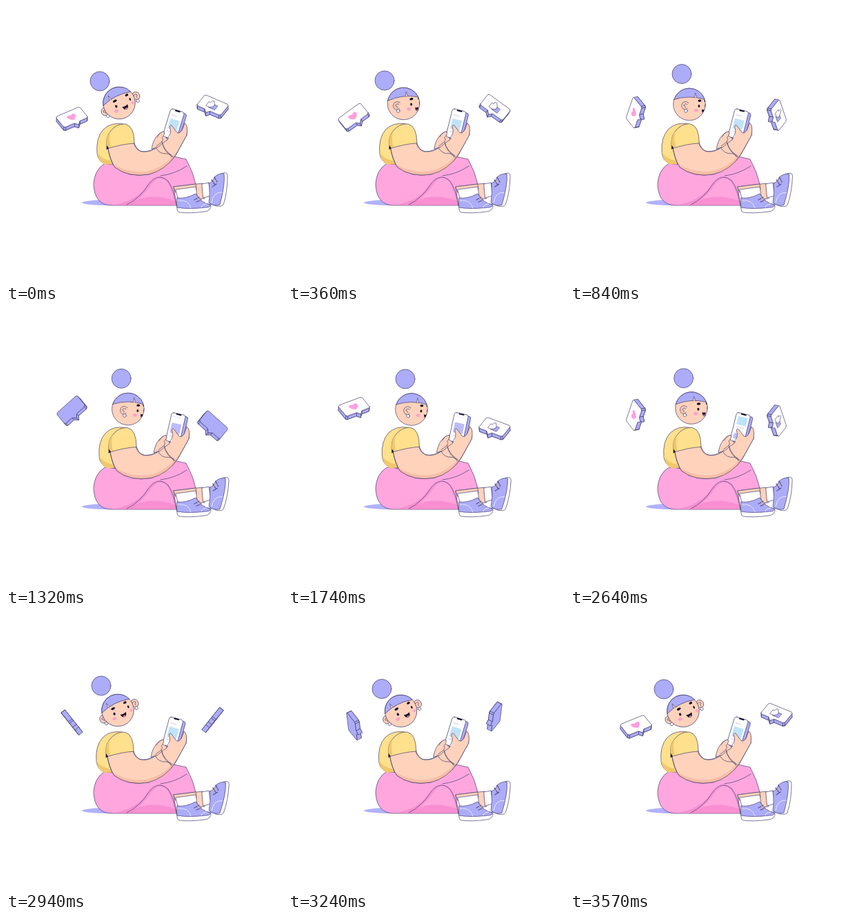
An HTML page for the animation above (3600 ms loop, 400x400 px).

```html
<!DOCTYPE html>
<html lang="en">
<head>
<meta charset="utf-8">
<title>Scrolling on the phone</title>
<style>
  html, body { margin: 0; width: 100%; height: 100%; overflow: hidden; background: #fff; }
  svg { display: block; width: 100vw; height: 100vh; stroke: #45406e; stroke-width: .7; stroke-linejoin: round; stroke-linecap: round; }
  .skin { fill: #ffd2bc; } .lav { fill: #acacf8; } .white { fill: #fff; } .pink { fill: #ffa6df; }
  .yellow { fill: #ffe08c; } .dark { fill: #15132b; } .line { fill: none; } .flat { stroke: none; }
</style>
</head>
<body>
<svg viewBox="0 0 400 400">
  <clipPath id="skull"><circle r="23.3"/></clipPath>
  <clipPath id="screen"><rect x="-8.5" y="-16" width="17" height="33"/></clipPath>

  <ellipse class="flat" fill="#b2b2fa" cx="150" cy="285" rx="40" ry="4"/>

  <!-- far foot -->
  <path class="skin" d="M268 259L285 257L288 279L272 280Z"/>
  <path class="white" d="M284 258L294 256L297 275L286 278Z"/>
  <g id="farShoe">
    <path class="white" d="M312 243Q321 239 321 246Q321 270 315 288Q313 291 305 290L297 287Z"/>
    <path class="lav" d="M294 257Q299 256 302 248Q308 242 316 243Q318 258 310 288Q301 291 294 285Q296 272 294 257Z"/>
    <path class="line" stroke="#fff" d="M298 285Q300 269 313 270"/>
    <path class="line" stroke="#5c5390" stroke-width="1.3" d="M298 252L303 259M302 248L306 255M299 262L305 258"/>
    <path class="line" stroke="#e9c46a" d="M300 256L305 252"/>
  </g>

  <!-- legs -->
  <path class="pink" d="M142 229Q128 238 127 258Q128 289 154 289H247L243 262L275 258Q271 240 261 222L225 214Z"/>
  <path class="flat" fill="#f78fd0" d="M154 288.5Q190 283 207 258Q221 241 234 252Q241 262 246 288.5Z"/>
  <path class="flat pink" d="M181 284Q198 278 210 259Q222 243 233 254Q240 264 244 282Q210 270 181 284Z"/>
  <path class="line" d="M175 288Q194 279 206 259Q220 240 235 254Q243 265 247 289M155 229Q171 231 180 237M262 232Q244 244 224 246"/>

  <!-- near foot -->
  <path class="skin" d="M243 262L275 258L276 266L246 270Z"/>
  <path class="white" d="M246 266L275 262L277 275L250 281Z"/>
  <path class="white" d="M248 289L297 287Q298 297 288 298Q266 301 251 299Q247 298 248 289Z"/>
  <path class="lav" d="M248 278Q260 280 275 272Q282 285 296 288Q297 292 289 292Q264 295 248 292Z"/>
  <path class="line" stroke="#fff" d="M249 282Q265 280 268 293M283 292Q284 287 291 287"/>
  <path class="line" stroke="#5c5390" stroke-width="1.3" d="M273 281L280 277M276 284L283 281"/>
  <path class="line" stroke="#e9c46a" d="M277 278L282 282"/>

  <g id="torso">
    <path class="yellow" d="M156 229Q135 232 132 214Q130 191 141 179Q152 168 170 171L168 205Z"/>
    <path class="flat" fill="#f0c76d" d="M144 230Q134 227 132 212Q138 222 151 224L155 229Z"/>
    <path class="skin" d="M147 203Q151 224 158 234Q178 249 207 244Q231 238 246 216L262 187Q263 172 258 169L234 187Q226 196 221 203Q209 213 197 211Q189 209 185 196Z"/>
    <path class="flat" fill="#f8bda7" d="M155 229Q180 244 207 239Q232 232 247 211Q235 240 205 244Q176 248 158 234Z"/>
    <path class="line" d="M185 199Q189 211 199 211Q211 211 220 203M226 197Q229 212 242 219M217 205Q222 215 233 214Q238 214 240 219M148 207Q151 225 158 234Q178 249 207 244Q231 238 246 216L262 187"/>
    <path class="yellow" d="M146 207Q144 190 151 182Q160 170 173 171Q186 174 186 199Q168 200 146 207Z"/>
    <path class="flat" fill="#f0c76d" d="M146 206Q144 190 151 182Q149 197 152 204Z"/>
    <path class="dark flat" d="M146 202L149 206L146 208Z"/>
    <path class="skin" d="M211 207Q213 193 222 185Q229 180 232 185L234 194Q226 199 221 204Z"/>
    <g id="phone">
      <rect class="lav" x="-6" y="-19.500" width="20" height="42" rx="3"/>
      <rect class="white" x="-10.500" y="-21" width="20.500" height="42" rx="3"/>
      <rect class="dark flat" x="-4" y="-21" width="8" height="2" rx="1"/>
      <g clip-path="url(#screen)"><g id="feed" class="flat">
        <rect x="-7" y="-13" width="9" height="1.200" fill="#d6d6e8"/>
        <rect x="-7" y="-7" width="14" height="15" fill="#bfe3f7"/>
        <rect x="-7" y="11" width="12" height="1.200" fill="#d6d6e8"/>
        <rect x="-7" y="21" width="14" height="15" fill="#bcbcfa"/>
        <rect x="-7" y="40" width="12" height="1.200" fill="#d6d6e8"/>
      </g></g>
    </g>
    <path class="skin" d="M219 190Q224 182 229 182Q231 186 226 191Q229 193 226 197L218 203"/>
    <path class="skin flat" d="M238 178Q236 172 240 173L246 181Q251 188 256 179L259 169Q264 172 262 186L248 211L231 198Q239 192 238 178Z"/>
    <path class="line" d="M235 190Q240 184 238 178Q236 172 240 173L246 181Q250 188 255 180L259 170Q264 172 262 187M226 197Q229 210 241 217"/>
  </g>

  <circle id="bun" class="lav" r="14"/>
  <g id="head"></g>
  <g id="heartCard"></g>
  <g id="thumbCard"></g>
</svg>
<script>
const $ = id => document.getElementById(id);
const LOOP = 3600, R = 23.3, RAD = Math.PI / 180;

// Smooth monotone curve through cyclic keys; `gain` is added every period.
function curve(times, values, period = LOOP, gain = 0) {
  const n = times.length;
  const key = i => {
    const lap = Math.floor(i / n), j = i - lap * n;
    return [times[j] + lap * period, values[j] + lap * gain];
  };
  const slope = i => {
    const [a, b] = [key(i), key(i + 1)];
    return (b[1] - a[1]) / (b[0] - a[0]);
  };
  const tangent = i => {
    const a = slope(i - 1), b = slope(i);
    return a * b <= 0 ? 0 : 2 * a * b / (a + b);
  };
  return time => {
    const t = time % period;
    let i = n - 1;
    while (times[i] > t) i--;
    const [t0, v0] = key(i), [t1, v1] = key(i + 1), d = t1 - t0, u = (t - t0) / d;
    return v0 + (v1 - v0) * u * u * (3 - 2 * u) +
      d * u * (1 - u) * (tangent(i) * (1 - u) - tangent(i + 1) * u);
  };
}

const beats = [0, 360, 840, 1740, 2340, 2640, 2940, 3200];
const headX = curve(beats, [164, 167.5, 173, 179, 180, 176, 162, 163.5]);
const headY = curve(beats, [140.5, 141.5, 142.5, 144, 143.5, 142, 139.5, 140.5]);
const yaw = curve(beats, [15, 58, 67, 67, 66, 55, 13, 15]);
const tilt = curve(beats, [-27, -7, 0, 0, 0, -4, -27, -27]);
const lean = curve(beats, [0, .8, 1.3, 4.5, 5, 4, -1, -.3]);
const phoneTurn = curve(beats, [17, 14, 14, 12, 12, 14, 15, 17]);
const scroll = curve([0, 1000, 1350, 2450, 2800], [0, 0, -28, -28, 0]);
const bunBeats = [0, 360, 550, 840, 1740, 2340, 2680, 2940, 3240];
const bunX = curve(bunBeats, [136, 140, 153, 162, 170, 172.5, 163, 138, 136]);
const bunY = curve(bunBeats, [109, 108, 99.3, 98.5, 100, 99, 98.8, 104, 108.5]);
const toe = curve([0, 360, 840, 1740, 2340, 2940], [0, 1.5, 2, 3, 0, 3]);
const spin = curve([0, 360, 540, 840, 1140, 1440, 1740], [0, 20, 38, 72, 115, 275, 356], 1800, 360);

function drawHead(t) {
  const turn = yaw(t);
  // Puts a small drawing on the sphere of the head.
  const place = (lon, lat, shape, radius = R) => {
    const a = (lon + turn) * RAD, x = radius * Math.sin(a) * Math.cos(lat * RAD);
    if (Math.cos(a) < -.15) return '';
    return `<g transform="translate(${x} ${-R * Math.sin(lat * RAD)}) scale(${Math.max(.35, Math.cos(a))} 1)">${shape}</g>`;
  };
  const ear = side => {
    const a = (side * 80 + turn) * RAD;
    if (Math.cos(a) < -.3) return '';
    return `<g transform="translate(${26.5 * Math.sin(a)} 2) scale(${side * -1} 1)">
      <path class="skin" d="M5 -4Q0 -8 -4 -4Q-7 1 -3 5Q0 7 3 4"/>
      <path class="line" d="M3 -2Q-2 -4 -2 0Q1 0 0 3"/>
      <circle class="white" cx="1" cy="7.500" r="2.300"/></g>`;
  };
  const behind = turn < 38;
  const eyes = [-1, 1].map(s =>
    place(s * 30, -6, '<ellipse class="dark flat" rx="1.700" ry="2"/>') +
    place(s * 26, 13, '<ellipse class="dark flat" rx="3.200" ry="1.700"/>') +
    place(s * 40, -22, '<ellipse class="flat" rx="3.200" ry="2.300" fill="#ff9fca"/>')).join('');
  const mouth = place(0, -23, '<path class="dark flat" d="M-4.500 -2Q0 0 4.500 -2Q4 4 0 4Q-4 4 -4.500 -2Z"/><ellipse class="flat" cy="2.600" rx="2" ry="1" fill="#f58ab5"/>');
  $('head').setAttribute('transform', `translate(${headX(t)} ${headY(t)}) rotate(${tilt(t)})`);
  $('head').innerHTML = (behind ? ear(-1) + ear(1) : '') +
    `<circle class="skin" r="${R}"/>
    <g clip-path="url(#skull)">${eyes}${mouth}</g>
    <path class="lav" d="M-22.200 -7A${R} ${R} 0 0 1 22.200 -7Q0 -14 -22.200 -7Z"/>` +
    place(-42, 27, '<path class="skin" d="M-1.500 0.500L0 -6L2 0.500" stroke-width=".6"/>') +
    (behind ? '' : ear(-1));
}

const bubble = [[-20, -10.5], [-18, -12.5], [18, -12.5], [20, -10.5], [20, 10.5], [18, 12.5],
  [6, 12.5], [1, 18], [-3, 12.5], [-18, 12.5], [-20, 10.5]];
const heart = '<path fill="#ff9fe0" class="flat" d="M0 6.500C-11 0 -7 -9 0 -3.500C7 -9 11 0 0 6.500Z"/>';
const thumb = `<path class="lav" d="M-7 -2H3V7H-7Z"/>
  <path class="white" d="M-2 -2L2 -8Q6 -8 5 -3H8V6H2L-2 3Z"/>`;

// A thick bubble turning about its own upright axis, seen in parallel projection.
function drawCard(id, x, y, flip, icon, angle) {
  const c = Math.cos(angle * RAD), s = Math.sin(angle * RAD);
  const u = [.86 * c, -.37 * c - .69 * s], v = [.5, .62];
  const n = [-.86 * s, -.69 * c + .37 * s];
  const uz = -.354 * c + .72 * s, vz = .594, facing = .72 * c + .354 * s > 0;
  const point = ([a, b], h) => [a * u[0] + b * v[0] + h * n[0], a * u[1] + b * v[1] + h * n[1]];
  const poly = (pts, cls) => `<polygon class="${cls}" points="${pts.join(' ')}"/>`;
  const layer = (h, cls) => poly(bubble.map(p => point(p, h)), cls);
  let art = layer(facing ? -3.5 : 3.5, 'lav');
  bubble.forEach((p, i) => {
    const q = bubble[(i + 1) % bubble.length];
    if ((q[1] - p[1]) * uz - (q[0] - p[0]) * vz > 0)
      art += poly([point(p, 3.5), point(q, 3.5), point(q, -3.5), point(p, -3.5)], 'lav');
  });
  art += layer(facing ? 3.5 : -3.5, facing ? 'white' : 'lav');
  if (facing) art += `<g transform="matrix(${[...u, ...v, ...point([0, 0], 3.5)]})">${icon}</g>`;
  $(id).setAttribute('transform', `translate(${x} ${y}) scale(${flip} 1)`);
  $(id).innerHTML = art;
}

function draw(t) {
  const bob = Math.cos(t / LOOP * 2 * Math.PI), k = lean(t), angle = spin(t);
  $('torso').setAttribute('transform', `translate(${k} ${-k * .15})`);
  $('phone').setAttribute('transform', `translate(243 171.500) rotate(${phoneTurn(t)})`);
  $('feed').setAttribute('transform', `translate(0 ${scroll(t)})`);
  $('farShoe').setAttribute('transform', `rotate(${toe(t)} 300 288)`);
  $('bun').setAttribute('transform', `translate(${bunX(t)} ${bunY(t)})`);
  drawHead(t);
  drawCard('heartCard', 95.5, 153 + 10.5 * bob, 1, heart, angle);
  drawCard('thumbCard', 299.5, 159 - 13 * bob, -1, thumb, angle);
}

const start = performance.now();
function tick() {
  draw((performance.now() - start) % LOOP);
  requestAnimationFrame(tick);
}
tick();
</script>
</body>
</html>
```
